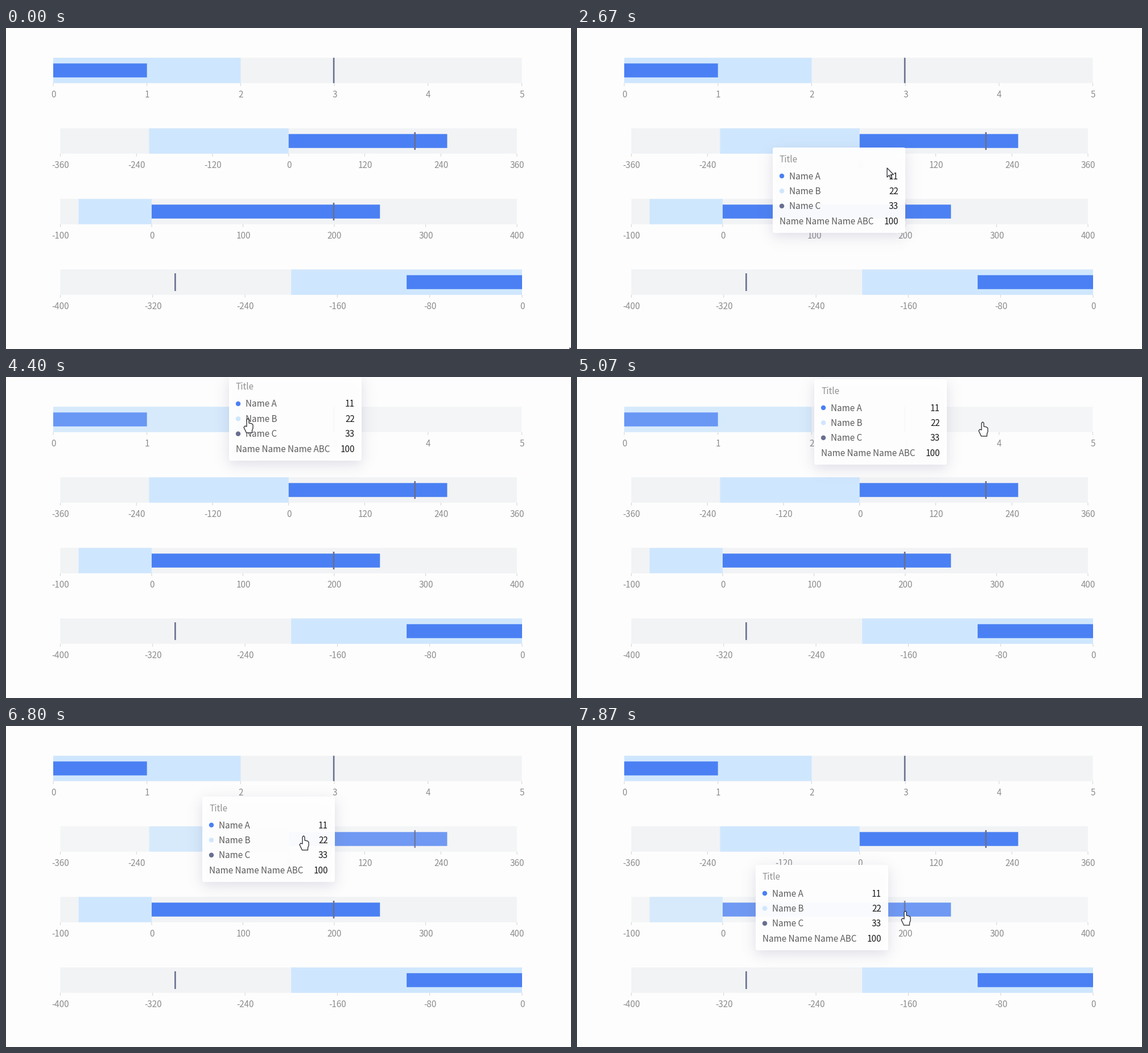
These frames come from a looping animation (993x564 px, 8000 ms). A matplotlib script:

```python
import numpy as np
import matplotlib.pyplot as plt
from matplotlib.animation import FuncAnimation
from matplotlib.patches import Circle, FancyBboxPatch, Polygon, Rectangle
from matplotlib.transforms import Affine2D

W, H, DPI = 993, 564, 64
LOOP, STEP = 8000, 50
PX = 72 / DPI  # points per pixel

BLUE, PALE, SLATE, TRACK = "#4a80f3", "#cfe7fe", "#686f90", "#f1f3f5"
TIP_W, TIP_H, TIP_GAP = 233, 150, 20
ROW_GAP, ROW_TOP, ROW_H = 124, 52.3, 44.5

plt.rcParams["font.family"] = ["Noto Sans CJK JP", "DejaVu Sans"]

fig = plt.figure(figsize=(W / DPI, H / DPI), dpi=DPI, facecolor="#fdfdfd")
ax = fig.add_axes([0, 0, 1, 1])
ax.axis("off")


def rect(x0, x1, y, h, color, z):
    return ax.add_patch(Rectangle((x0, y), x1 - x0, h, fc=color, lw=0,
                                  zorder=z, snap=False))


def label(x, y, s, color, ha="left", z=3, **kw):
    """Text whose capitals are centred on y."""
    return ax.text(x, y + 5.5, s, color=color, fontsize=15.25 * PX, ha=ha,
                   va="baseline", zorder=z, **kw)


# --- bullet charts -------------------------------------------------------

class Bullet:
    def __init__(self, i, x0, x1, ticks, bar, pale, target, inset=6.7):
        lo, hi = ticks[0], ticks[-1]

        def pos(v):
            return x0 + (v - lo) / (hi - lo) * (x1 - x0)

        self.x0, self.x1 = x0, x1
        self.y = y = ROW_TOP + i * ROW_GAP
        zero, mark = pos(0), pos(target) - 1
        self.parts = [
            rect(x0, x1, y, ROW_H, TRACK, 1),
            rect(*sorted((zero, pos(pale))), y, ROW_H, PALE, 1.1),
            rect(*sorted((zero, pos(bar))), y + 10, 24.5, BLUE, 1.2),
            rect(mark - 1.3, mark + 1.3, y + inset, ROW_H - 2 * inset, SLATE, 1.3),
        ]
        for v in ticks:
            rect(pos(v) - 0.5, pos(v) + 0.5, y + ROW_H, 5, "#d2d2d4", 1)
            label(pos(v) + 0.5, y + 63.7, str(v), "#8e8e8e", "center")

    def hit(self, x, y):
        return (self.x0 <= x) & (x <= self.x1) & (self.y <= y) & (y <= self.y + ROW_H)

    def set_dim(self, k):
        for p in self.parts:
            p.set_alpha(1 - 0.22 * k)


rows = [
    Bullet(0, 83, 906.5, range(0, 6), 1, 2, 3, inset=0),
    Bullet(1, 95.5, 898, range(-360, 361, 120), 250, -220, 200),
    Bullet(2, 95.5, 898, range(-100, 401, 100), 250, -80, 200),
    Bullet(3, 95.5, 907, range(-400, 1, 80), -100, -200, -300),
]

# --- tooltip -------------------------------------------------------------

tip_shift = Affine2D()
tip_tf = tip_shift + ax.transData


def edge(n, a, b, soft=7):
    """Soft window that is open between a and b."""
    x = np.arange(n) + 0.5
    return 1 / (1 + np.exp((a - x) / soft)) / (1 + np.exp((x - b) / soft))


PAD = 45
shade = np.full((TIP_H + 2 * PAD, TIP_W + 2 * PAD, 4), 0.36)
shade[..., 2] = 0.55
shade[..., 3] = 0.2 * np.outer(edge(TIP_H + 2 * PAD, PAD + 7, PAD + TIP_H + 6),
                               edge(TIP_W + 2 * PAD, PAD, PAD + TIP_W))
shadow = ax.imshow(shade, extent=(-PAD, TIP_W + PAD, TIP_H + PAD, -PAD),
                   aspect="auto", zorder=5, transform=tip_tf)
ax.set_xlim(0, W)
ax.set_ylim(H, 0)

panel = ax.add_patch(FancyBboxPatch(
    (0, 0), TIP_W, TIP_H, boxstyle="round,pad=0,rounding_size=3",
    fc="white", lw=0, zorder=6, transform=tip_tf))

tip = [label(12, 20, "Title", "#929292", z=7, transform=tip_tf)]
entries = [("Name A", 11, BLUE), ("Name B", 22, PALE), ("Name C", 33, SLATE),
           ("Name Name Name ABC", 100, None)]
for n, (name, value, dot) in enumerate(entries):
    y = 50 + 26.4 * n
    if dot:
        tip.append(ax.add_patch(Circle((16, y), 4.2, fc=dot, lw=0, zorder=7,
                                       transform=tip_tf)))
    tip.append(label(29 if dot else 12, y, name, "#5e5e5e", z=7, transform=tip_tf))
    tip.append(label(221, y, str(value), "#1c1c1c", "right", z=7, transform=tip_tf))

# --- pointer -------------------------------------------------------------

cur_shift = Affine2D()
cur_tf = cur_shift + ax.transData


def pointer(points):
    return ax.add_patch(Polygon(points, fc="white", ec="#2b2b33", lw=1.3 * PX,
                                joinstyle="round", zorder=9, transform=cur_tf))


arrow = pointer([(0, 0), (0, 16), (3.7, 12.7), (6.2, 18.2), (8.6, 17.1),
                 (6.2, 11.8), (11.3, 11.6)])
hand = pointer([(-2, 13), (-2, 1), (0, -1), (2, 1), (2, 7), (7, 8), (9, 10),
                (9, 16), (7.5, 20), (7.5, 24), (-2.5, 24), (-7, 14.5), (-5, 12)])

# --- motion --------------------------------------------------------------

# Stops of the pointer: time, x, y
stops = np.array([
    (730, 991, 562), (1130, 951, 538), (1670, 951, 538), (1930, 830, 513),
    (2450, 650, 320), (3150, 300, 72), (3400, 254, 68), (4070, 254, 68),
    (4600, 520, 77), (5070, 717, 80), (5600, 903, 82), (5930, 903, 82),
    (6060, 903, 190), (6240, 900, 193), (6260, 670, 192), (6640, 670, 205),
    (6810, 523, 194), (7480, 515, 205), (7540, 550, 322), (7860, 577, 326)]).T

DT, LAG, FADE = 10, 120, 160
clock = np.arange(0, LOOP, DT)
cx, cy = (np.interp(clock, stops[0], s) for s in stops[1:])

# The tooltip eases towards the side of the pointer that has more room.
side = np.where(cx < W / 2, TIP_GAP, -TIP_GAP - TIP_W)
goal = np.column_stack([cx + side, cy - TIP_H / 2])
place = goal.copy()
for k in range(1, len(clock)):
    place[k] = place[k - 1] + (goal[k] - place[k - 1]) * DT / LAG

hits = np.array([row.hit(cx, cy) for row in rows])
first_hit = clock[hits.any(axis=0).argmax()]


def update(i):
    k = (i * STEP + 10) // DT
    recent = hits[:, max(0, k - FADE // DT):k + 1]
    for row, dim in zip(rows, recent.mean(axis=1)):
        row.set_dim(dim)

    over = hits[:, k].any()
    hand.set_visible(over)
    arrow.set_visible(not over)
    cur_shift.clear().translate(round(cx[k]), round(cy[k]))

    tip_shift.clear().translate(*np.round(place[k]))
    show = float(np.clip((clock[k] - first_hit) / FADE, 0, 1))
    for a in [shadow, panel, *tip]:
        a.set_visible(show > 0)
        a.set_alpha(show)
    panel.set_alpha(0.96 * show)
    return []


anim = FuncAnimation(fig, update, frames=LOOP // STEP, interval=STEP,
                     init_func=lambda: update(0), repeat=True, repeat_delay=0,
                     blit=False)
plt.show()
```
